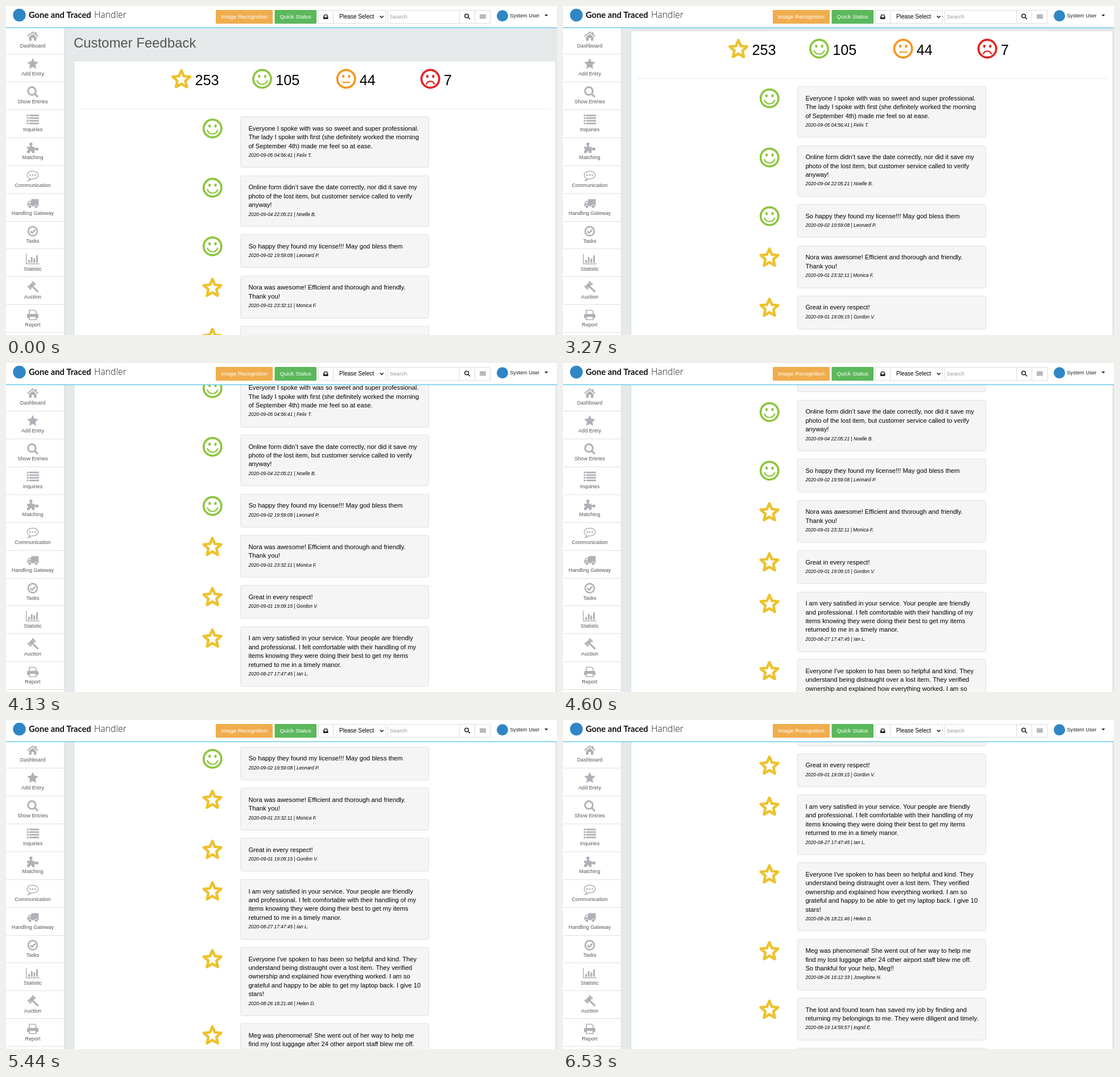
Animation of 969x578 px, one loop 9400 ms. Source, as an HTML page with a canvas:

```html
<!DOCTYPE html>
<html lang="en">
<head>
<meta charset="utf-8">
<title>Customer Feedback</title>
<style>
html, body { margin: 0; width: 100%; height: 100%; overflow: hidden; background: #fff; }
canvas { display: block; }
</style>
</head>
<body>
<canvas id="stage" width="969" height="578"></canvas>
<script>
const ctx = document.getElementById('stage').getContext('2d');
const W = 969, H = 578, LOOP = 9400, TAU = Math.PI * 2;
const SANS = '"Liberation Sans", Arial, sans-serif';
const GREEN = '#8cc63f', YELLOW = '#ecc22f', ORANGE = '#f7941d', RED = '#e62222';
const GRAY = '#aeb1b7', BLUE = '#2f86c5';

const cards = [
  ['smile', '2020-09-05 04:56:41 | Felix T.',
    'Everyone I spoke with was so sweet and super professional.',
    'The lady I spoke with first (she definitely worked the morning',
    'of September 4th) made me feel so at ease.'],
  ['smile', '2020-09-04 22:05:21 | Noelle B.',
    'Online form didn’t save the date correctly, nor did it save my',
    'photo of the lost item, but customer service called to verify',
    'anyway!'],
  ['smile', '2020-09-02 19:59:08 | Leonard P.',
    'So happy they found my license!!! May god bless them'],
  ['star', '2020-09-01 23:32:11 | Monica F.',
    'Nora was awesome! Efficient and thorough and friendly.',
    'Thank you!'],
  ['star', '2020-09-01 19:09:15 | Gordon V.',
    'Great in every respect!'],
  ['star', '2020-08-27 17:47:45 | Ian L.',
    'I am very satisfied in your service. Your people are friendly',
    'and professional. I felt comfortable with their handling of my',
    'items knowing they were doing their best to get my items',
    'returned to me in a timely manor.'],
  ['star', '2020-08-26 18:21:46 | Helen D.',
    "Everyone I've spoken to has been so helpful and kind. They",
    'understand being distraught over a lost item. They verified',
    'ownership and explained how everything worked. I am so',
    'grateful and happy to be able to get my laptop back. I give 10',
    'stars!'],
  ['star', '2020-08-26 16:12:33 | Josephine N.',
    'Meg was phenomenal! She went out of her way to help me',
    'find my lost luggage after 24 other airport staff blew me off.',
    'So thankful for your help, Meg!!'],
  ['star', '2020-08-19 14:59:57 | Ingrid E.',
    'The lost and found team has saved my job by finding and',
    'returning my belongings to me. They were diligent and timely.'],
  ['star', '', '']
];

// Scrolling: bursts of discrete steps, with the offset known at a few steps.
const BURSTS = [2960, 3980, 4980, 5990];
const OFFSETS = [[0, 11.2], [8, 95], [15, 171.7], [26, 284], [38, 425], [46, 503.1]];

function scrollAt(t) {
  if (t < BURSTS[0]) return 0;
  const b = BURSTS.filter(s => t >= s).length - 1;
  const step = Math.min(46, 13 * b + Math.min(12, Math.floor((t - BURSTS[b] + 6) / 77.3)));
  for (let i = 1; i < OFFSETS.length; i++) {
    const [k0, y0] = OFFSETS[i - 1], [k1, y1] = OFFSETS[i];
    if (step <= k1) return y0 + (y1 - y0) * (step - k0) / (k1 - k0);
  }
}

function rect(x, y, w, h, color) {
  ctx.fillStyle = color;
  ctx.fillRect(x, y, w, h);
}

function box(x, y, w, h, r, fill, stroke) {
  ctx.beginPath();
  ctx.roundRect(x, y, w, h, r);
  ctx.fillStyle = fill;
  ctx.fill();
  if (!stroke) return;
  ctx.strokeStyle = stroke;
  ctx.lineWidth = 1;
  ctx.stroke();
}

function disc(x, y, r, color) {
  ctx.beginPath();
  ctx.arc(x, y, r, 0, TAU);
  ctx.fillStyle = color;
  ctx.fill();
}

function line(d, width, color) {
  ctx.strokeStyle = color;
  ctx.lineWidth = width;
  ctx.stroke(new Path2D(d));
}

function shape(d, color) {
  ctx.fillStyle = color;
  ctx.fill(new Path2D(d));
}

function text(str, x, y, size, color = '#000', align = 'left', style = '', family = SANS) {
  ctx.font = `${style} ${size}px ${family}`;
  ctx.textAlign = align;
  ctx.fillStyle = color;
  ctx.fillText(str, x, y);
}

function at(x, y, draw) {
  ctx.save();
  ctx.translate(x, y);
  draw();
  ctx.restore();
}

function starPath(r, inner) {
  ctx.beginPath();
  for (let i = 0; i < 10; i++) {
    const a = i * Math.PI / 5 - Math.PI / 2, d = i % 2 ? r * inner : r;
    ctx.lineTo(d * Math.cos(a), d * Math.sin(a));
  }
  ctx.closePath();
}

function starIcon(x, y) {
  at(x, y, () => {
    starPath(16.2, 0.46);
    ctx.lineJoin = 'round';
    ctx.lineWidth = 4.6;
    ctx.strokeStyle = YELLOW;
    ctx.stroke();
  });
}

function face(x, y, color, mouth) {
  at(x, y, () => {
    ctx.strokeStyle = ctx.fillStyle = color;
    ctx.lineWidth = 3.7;
    ctx.beginPath();
    ctx.arc(0, 0, 15.6, 0, TAU);
    ctx.stroke();
    for (const side of [-1, 1]) {
      ctx.beginPath();
      ctx.ellipse(side * 5.2, -4.4, 2.1, 2.7, 0, 0, TAU);
      ctx.fill();
    }
    ctx.lineCap = 'round';
    line(mouth, 2.2, color);
  });
}

const SMILE = 'M-9 3.3A9.6 9.6 0 0 0 9 3.3';
const FLAT = 'M-6 6H6';
const FROWN = 'M-7 9A7.6 7.6 0 0 1 7 9';

// Menu icons are drawn around their own centre.
const menu = [
  ['Dashboard', () => {
    line('M-9.3 .5L0 -7.3L9.3 .5', 2, GRAY);
    shape('M-6.5 1.5L0 -4L6.5 1.5V8H2V3H-2V8H-6.5ZM4 -7H6.8V-1L4 -3.5Z', GRAY);
  }],
  ['Add Entry', () => {
    starPath(10.5, 0.48);
    ctx.fillStyle = GRAY;
    ctx.fill();
  }],
  ['Show Entries', () => {
    line('M-8.3 -1.5A6.8 6.8 0 1 0 5.3 -1.5A6.8 6.8 0 1 0 -8.3 -1.5M3.5 3.5L9 9', 3, GRAY);
  }],
  ['Inquiries', () => {
    for (let i = 0; i < 4; i++) {
      rect(-10.5, -9 + i * 4.7, 3.4, 2.8, GRAY);
      rect(-6, -9 + i * 4.7, 17, 2.8, GRAY);
    }
  }],
  ['Matching', () => {
    shape('M-10 -1.5H-4.8V-5H-1.6V-1.5H3.2V1H7V4H3.2V9.5H-10Z', GRAY);
    disc(-3.2, -6.2, 2.8, GRAY);
    disc(7.4, 2.5, 2.7, GRAY);
    disc(-3.2, 8.2, 1.9, '#fff');
    disc(-9.6, 3.5, 1.7, '#fff');
  }],
  ['Communication', () => {
    line('M-5 5.3C-12 2.5 -11.5 -7.5 0 -7.5C13 -7.5 13 6 0 6L-2 6Q-5 9 -8 9Q-5.5 7.5 -5 5.3Z', 1.5, GRAY);
    for (const x of [-4.5, 0, 4.5]) disc(x, -0.8, 1.5, GRAY);
  }],
  ['Handling Gateway', () => {
    shape('M-2.5 -7.5H10.5V5H-9.5V0L-6.5 -4.5H-2.5Z', GRAY);
    shape('M-7.5 0L-5.7 -2.8H-3.8V0Z', '#fff');
    for (const x of [-5, 6]) {
      disc(x, 5.8, 3.2, '#fff');
      disc(x, 5.8, 2.4, GRAY);
    }
  }],
  ['Tasks', () => {
    line('M-8 0A8 8 0 1 0 8 0A8 8 0 1 0 -8 0', 2.6, GRAY);
    line('M-4.2 0L-1 3.2L4.5 -2.8', 2.8, GRAY);
  }],
  ['Statistic', () => {
    line('M-11.3 -9V8.5H12', 1.5, GRAY);
    [5, 10, 7.5, 13].forEach((h, i) => rect(-8 + i * 4.7, 6.5 - h, 3, h, GRAY));
  }],
  ['Auction', () => {
    ctx.rotate(Math.PI / 4);
    rect(-6.5, -4.5, 6.5, 8, GRAY);
    rect(-7.5, -7.3, 8.5, 2.4, GRAY);
    rect(-7.5, 3.9, 8.5, 2.4, GRAY);
    rect(0, -2, 13, 3.2, GRAY);
  }],
  ['Report', () => {
    line('M-6 -1V-8H3.5L6 -5.5V-1', 1.7, GRAY);
    box(-10, -1.5, 20, 7.5, 2, GRAY);
    shape('M-6 3H6V8.5H-6Z', '#fff');
    line('M-6 3H6V8.5H-6Z', 1.7, GRAY);
  }]
];

function drawCard([icon, stamp, ...lines], top) {
  const y = Math.round(top - 0.2), h = Math.round(43 + 15.4 * lines.length);
  const baseline = i => Math.round(top + 24.4 + i * 15.4);
  box(412.5, y + 0.5, 331, h, 2.8, '#f5f5f5', '#e0e0e0');
  if (icon === 'star') starIcon(363, y + 21.8);
  else face(363.2, y + 21.2, GREEN, SMILE);
  lines.forEach((s, i) => text(s, 426.4, baseline(i), 11.2));
  text(stamp, 426.4, baseline(lines.length), 8.4, '#000', 'left', 'italic');
}

function drawContent(offset) {
  rect(102, 38, W - 102, H - 38, '#e5e9ea');
  at(0, -Math.round(offset), () => {
    text('Customer Feedback', 119, 73, 23.9, '#555');
    box(119.5, 96.5, 847.5, 1200, 2, '#fff', '#d9dcdd');
    starIcon(308.5, 129.3);
    face(450.5, 128, GREEN, SMILE);
    face(598.2, 128, ORANGE, FLAT);
    face(746.2, 128, RED, FROWN);
    [['253', 332.5], ['105', 474.3], ['44', 621.8], ['7', 770]].forEach(([n, x]) => text(n, x, 139, 25.2));
    rect(130, 180, 827, 1, '#ebebeb');
  });
  let top = 194.5 - offset;
  for (const card of cards) {
    if (top < H && top > -140) drawCard(card, top);
    top += 57.25 + 15.4 * (card.length - 2);
  }
}

function drawMenu() {
  rect(0, 38, 102, H - 38, '#fff');
  rect(102, 38, 1, H - 38, '#d9dddf');
  menu.forEach(([label, icon], i) => {
    const y = i * 48.95;
    at(47, 53 + y, icon);
    text(label, 47, Math.round(73.2 + y), 9.1, '#555', 'center');
    rect(0, Math.round(83.8 + y), 102, 1, '#dfe1e2');
  });
}

function drawHeader() {
  rect(0, 0, W, 38, '#fff');
  rect(0, 37.4, W, 1.5, '#6accec');
  disc(23.5, 16, 11.2, BLUE);
  text('Gone and Traced', 40, 21, 14.7, '#111', 'left', 'bold', 'Lato, sans-serif');
  text('Handler', 155, 21, 15.8, '#222', 'left', '300', '"Open Sans", sans-serif');

  box(369.5, 7.5, 99, 23, 0, '#f0ad4e', '#eea843');
  text('Image Recognition', 419, 22, 9.8, '#fff', 'center');
  box(473, 7.5, 72.5, 23, 0, '#5cb85c', '#52b252');
  text('Quick Status', 509.2, 22, 9.8, '#fff', 'center');

  const border = '#dcdcdc';
  box(549.5, 7.5, 118, 23, 0, '#fff', border);
  rect(575, 7, 1, 24, border);
  shape('M558 19L559.6 15H564.9L566.5 19V23H558Z', '#222');
  shape('M559.5 19L560.6 16.3H563.9L565 19H563.6L563 20.5H561.5L560.9 19Z', '#fff');
  text('Please Select', 586, 22, 10);
  line('M657.7 17.5L660.7 20.5L663.7 17.5', 1.5, '#111');

  box(671.5, 7.5, 180, 23, 0, '#fff', border);
  rect(797, 7, 1, 24, border);
  rect(824, 7, 1, 24, border);
  text('Search', 674.8, 22, 9.8, '#999');
  line('M806.8 17.5A3.3 3.3 0 1 0 813.4 17.5A3.3 3.3 0 1 0 806.8 17.5M812.5 19.8L816 23.3', 1.6, '#222');
  rect(833, 14.5, 11, 8, '#b7b9bf');

  disc(873, 17.3, 10, BLUE);
  text('System User', 886.3, 20, 9.1, '#222');
  shape('M947 15H953.2L950.1 18.2Z', '#222');
}

function frame(now) {
  ctx.clearRect(0, 0, W, H);
  drawContent(scrollAt(now % LOOP));
  drawMenu();
  drawHeader();
  requestAnimationFrame(() => frame(performance.now() - start));
}

const start = performance.now();
frame(0);
</script>
</body>
</html>
```
